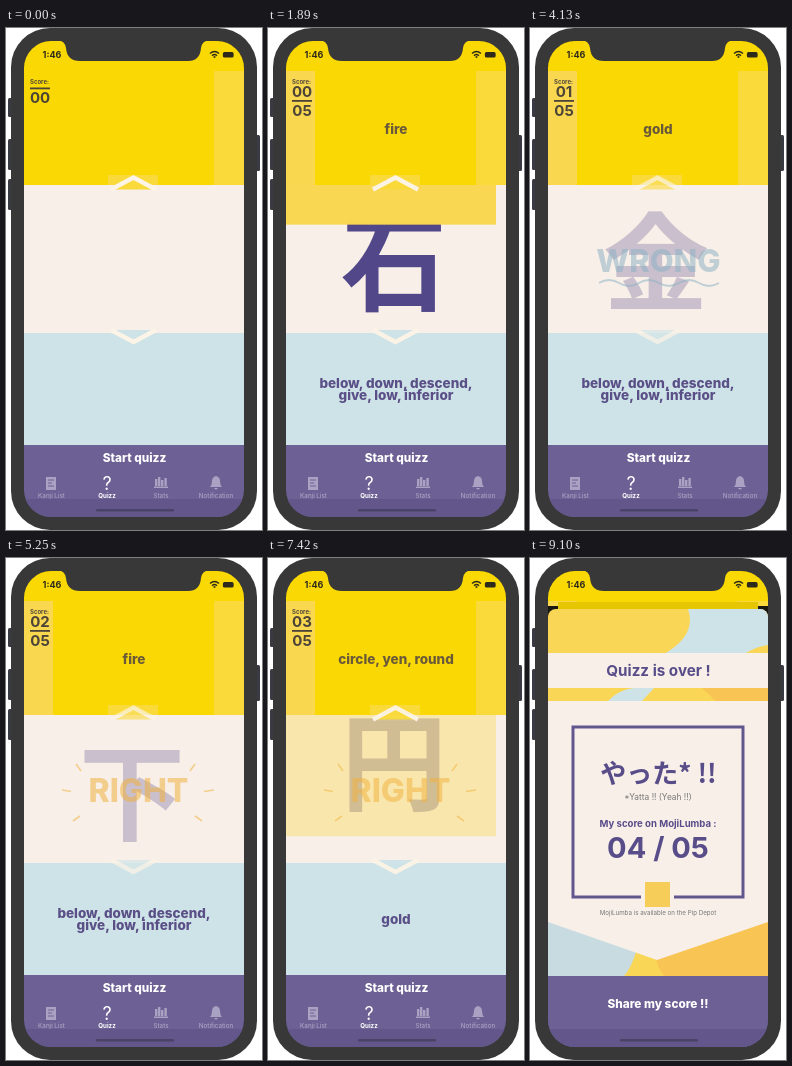
Animation of 256x502 px, one loop 9170 ms. Source, as an HTML page:

```html
<!DOCTYPE html>
<html lang="en">
<head>
<meta charset="utf-8">
<title>Quiz app</title>
<style>
html, body { margin: 0; width: 100%; height: 100%; overflow: hidden; background: #fff; }
svg { display: block; width: 100vw; height: 100vh; }
text { font-family: Inter, "Noto Sans CJK JP", "Noto Sans CJK", sans-serif; font-weight: 700; text-anchor: middle; fill: #584c89; }
.option { font-size: 13.5px; font-weight: 800; fill: #5a4f86; }
.action { font-size: 11.8px; font-weight: 800; fill: #fff; }
.tab { font-size: 6.2px; font-weight: 500; fill: #aaa2c3; }
.kanji { font-size: 106px; fill: #524788; }
.kanji, .kana { font-family: "Noto Sans CJK JP", "Noto Sans CJK", sans-serif; }
.score { font-size: 15px; fill: #4d4438; }
.small { font-weight: 400; fill: #777; }
</style>
</head>
<body>
<svg viewBox="0 0 256 502">
  <defs>
    <clipPath id="screenClip"><rect x="18" y="13" width="220" height="476" rx="27"/></clipPath>
    <clipPath id="cardClip"><rect x="18" y="157" width="220" height="148"/></clipPath>
    <clipPath id="sheetClip"><path d="M18 489V59a8 8 0 0 1 8-8H230a8 8 0 0 1 8 8V489Z"/></clipPath>
  </defs>

  <g fill="#393a42">
    <rect x="2" y="70" width="6" height="19" rx="1.5"/>
    <rect x="2" y="111" width="6" height="31" rx="1.5"/>
    <rect x="2" y="151" width="6" height="31" rx="1.5"/>
    <rect x="248" y="107" width="6" height="36" rx="1.5"/>
  </g>
  <rect x="5" y="0" width="246" height="502" rx="39" fill="#383839"/>

  <g clip-path="url(#screenClip)">
    <rect x="18" y="13" width="220" height="144" fill="#fad803"/>
    <path d="M208 43H238V157H208ZM102 147H152V157H102Z" fill="#fada3a"/>
    <rect id="margin" x="18" y="43" width="29" height="114" fill="#f9d850"/>
    <rect x="18" y="157" width="220" height="148" fill="#f7efe8"/>
    <rect x="18" y="305" width="220" height="112" fill="#cee3e8"/>
    <rect x="18" y="417" width="220" height="72" fill="#6c6094"/>

    <text class="score" x="33.5" y="56" style="font-size:6px">Score:</text>
    <text class="score" id="points" x="34" y="69.3"></text>
    <rect id="rule" x="24" width="20" height="1.8" fill="#4d4438"/>
    <text class="score" id="total" x="34"></text>

    <g clip-path="url(#cardClip)">
      <text class="kanji" id="kanji" x="126"></text>
      <rect id="cover" x="18" width="210"/>
    </g>

    <path id="bumps" d="M102 163 127.5 148 153 163ZM102 302 127.5 316 153 302Z" fill="#f7efe8"/>
    <g id="chevrons" stroke="#fcf4e6" stroke-width="4.5">
      <path d="M105 161.5 127.5 149.5 150 161.5" fill="#fada3a"/>
      <path d="M105 302 127.5 314 150 302" fill="#cee3e8"/>
    </g>

    <g id="right" stroke="#f1b13c" stroke-width="1.6">
      <text x="132.5" y="244" stroke="none" style="font-size:32px;font-weight:800;fill:#f1b13c">RIGHT</text>
      <path d="M70 206 75 213M56 232 65 233.5M67 263 74 258M189 206 184 213M208 232 198 233.5M196 263 189 258"/>
    </g>
    <g id="wrong">
      <text x="128.5" y="244" style="font-size:31px;font-weight:800;fill:#8fb3c4">WRONG</text>
      <path d="M69 255q10-6 20 0t20 0 20 0 20 0 20 0 20 0" fill="none" stroke="#8fb3c4" stroke-width="1.8"/>
    </g>

    <g id="options">
      <text class="option" id="upper" x="128" y="106" style="fill:#6b5a3a"></text>
      <text class="option" id="lower" x="128"></text>
      <text class="option" id="lower2" x="128" y="372"></text>
    </g>

    <text class="action" x="128.5" y="434">Start quizz</text>
    <g fill="#aaa2c3">
      <path d="M40 449H50V462H40Z"/>
      <path d="M42 452H48M42 455H46M42 458H48" stroke="#6c6094"/>
      <path d="M149 451h2.4v7h-2.4zM152 449h2.4v9h-2.4zM155 452h2.4v6h-2.4zM158.4 450h2.4v8h-2.4zM148 458.5h14v1.5h-14z"/>
      <path d="M204 459Q206 457 206 453Q206 449 210 448Q214 449 214 453Q214 457 216 459ZM208 460H212Q210 463 208 460Z"/>
    </g>
    <text x="101" y="462" style="font-size:18px;font-weight:400;fill:#fff">?</text>
    <text class="tab" x="45.5" y="470">Kanji List</text>
    <text class="tab" x="101" y="470" style="fill:#fff;font-weight:700">Quizz</text>
    <text class="tab" x="155" y="470">Stats</text>
    <text class="tab" x="210" y="470">Notification</text>

    <g id="backdrop">
      <path d="M18 48H238V70H18Z" fill="#181712"/>
      <path d="M28 52V44H228V70H28Z" fill="#e6c600"/>
    </g>

    <g id="sheet">
      <g clip-path="url(#sheetClip)">
        <rect x="18" y="51" width="220" height="370" fill="#f9d656"/>
        <path d="M158 51Q167 76 136 95H216Q228 88 238 87V51Z" fill="#cee3e8"/>
        <path d="M78 143Q90 131 104 130H124L112 143Z" fill="#cee3e8"/>
        <path d="M172 130H238V147H190Z" fill="#f8c453"/>
        <rect x="18" y="95" width="220" height="35" fill="#f7efe8"/>
        <path d="M18 360H112Q108 402 94 418H18Z" fill="#c8dbe0"/>
        <path d="M238 360H130Q118 398 134 418H238Z" fill="#f8c453"/>
        <path d="M18 143H238V364L127 402 18 364Z" fill="#f7efe8"/>
        <rect x="18" y="418" width="220" height="90" fill="#6c6094"/>
      </g>
      <text x="128.5" y="117.5" style="font-size:15.2px">Quizz is over !</text>
      <path d="M111 339H43V169H213V339H144" fill="none" stroke="#62568f" stroke-width="3"/>
      <text class="kana" x="128.5" y="225" style="font-size:26px">やった* !!</text>
      <text class="small" x="128" y="241.5" style="font-size:8.4px">*Yatta !! (Yeah !!)</text>
      <text x="128" y="269" style="font-size:9.6px">My score on MojiLumba :</text>
      <text x="128" y="299.5" style="font-size:29px">04 / 05</text>
      <rect x="115" y="324" width="25" height="25" fill="#f6cd58"/>
      <text class="small" x="128" y="356.5" style="font-size:6.2px">MojiLumba is available on the Pip Depot</text>
      <text class="action" x="128" y="449.5">Share my score !!</text>
    </g>

    <rect x="18" y="471" width="220" height="18" fill="#62568a"/>
    <rect x="90" y="481" width="78" height="2.4" rx="1.2" fill="#4b4268"/>

    <text x="46" y="30" style="font-size:9px;fill:#2d2a1c">1:46</text>
    <g fill="none" stroke="#2d2a1c" stroke-width="1.3">
      <path d="M204 25.5Q208.5 21.5 213 25.5M206 27.7Q208.5 25.3 211 27.7"/>
      <circle cx="208.5" cy="29" r=".4"/>
      <rect x="217.5" y="24.7" width="9.5" height="4.2" rx="1" fill="#2d2a1c"/>
    </g>
  </g>
  <path d="M52 12Q59 13 60 20Q61 33 74 33H182Q194 33 195 20Q196 13 203 12Z" fill="#383839"/>
</svg>

<script>
const LOOP = 9170, STEP = 70, START = 700, CARD = 148;
const BELOW = ["below, down, descend,", "give, low, inferior"];
const rounds = [
  { show: START, pick: 1820, kanji: "石", upper: "fire", lower: BELOW, up: true, right: true },
  { show: 2700, pick: 3680, kanji: "金", upper: "gold", lower: BELOW, up: false, right: false },
  { show: 4480, pick: 4800, kanji: "下", upper: "fire", lower: BELOW, up: false, right: true },
  { show: 5600, pick: 5980, kanji: "火", upper: "fire", lower: ["gold"], up: true, right: true },
  { show: 6780, pick: 7150, kanji: "円", upper: "circle, yen, round", lower: ["gold"], up: true, right: true }
];
// Each track is a list of [ms since the swipe, value].
const tracks = {
  kanji: [[0, 1], [100, 1], [270, .4], [450, .28], [620, .24], [780, 0]],
  shift: [[70, 0], [270, 30], [450, 0]],
  verdict: [[100, 0], [270, .5], [400, .55], [620, .5], [780, 0]],
  chevrons: [[0, 1], [270, .95], [430, .6], [620, .6], [780, 1]]
};

const $ = id => document.getElementById(id);
const clamp = v => Math.max(0, Math.min(1, v));
const set = (id, attrs) => { for (const k in attrs) $(id).setAttribute(k, attrs[k]); };
const write = (id, text) => { if ($(id).textContent !== text) $(id).textContent = text; };

function sample(track, t) {
  const i = track.findIndex(([at]) => at > t);
  if (i < 0) return track[track.length - 1][1];
  if (i === 0) return track[0][1];
  const [a, from] = track[i - 1], [b, to] = track[i];
  return from + (to - from) * (t - a) / (b - a);
}

function drawScore(t) {
  const started = t >= START;
  const points = rounds.filter(r => r.right && t >= r.pick + 380).length;
  write("points", started ? "0" + points : "");
  write("total", started ? "05" : "00");
  set("rule", { y: started ? 72 : 59.5 });
  set("total", { y: started ? 87.5 : 74.5 });
}

function drawRound(t) {
  const round = rounds.filter(r => t >= r.show).pop();
  const since = round ? t - round.pick : -1;
  const fadeIn = round ? clamp((t - round.show + STEP) / 210) : 0;
  const active = round || rounds[0];
  const dir = active.up ? -1 : 1;
  const shift = sample(tracks.shift, since) * dir;

  write("kanji", active.kanji);
  set("kanji", { y: 274 + shift, opacity: fadeIn * sample(tracks.kanji, since) });

  const two = active.lower.length > 1;
  write("upper", active.upper);
  write("lower", active.lower[0]);
  write("lower2", active.lower[1] || "");
  set("lower", { y: two ? 360 : 366 });
  set("options", { opacity: fadeIn });

  const progress = clamp(since / 440);
  const height = CARD * (1 - Math.pow(1 - progress, 1.8));
  set("cover", {
    y: active.up ? 157 : 305 - height,
    height,
    fill: active.up ? "#f9d752" : "#cee3e8",
    opacity: clamp(1.2 - 1.3 * progress)
  });
  // The swipe that follows the start leaves a lighter strip beside the score.
  set("margin", { opacity: t >= rounds[0].pick ? 1 : 0 });

  const verdict = sample(tracks.verdict, since);
  set("right", { opacity: active.right ? verdict : 0 });
  set("wrong", { opacity: active.right ? 0 : verdict });
  const chevrons = sample(tracks.chevrons, since);
  set("chevrons", { opacity: chevrons });
  set("bumps", { opacity: 1 - chevrons });
}

function drawSheet(t) {
  const progress = clamp((t - 7650) / 520);
  set("sheet", { transform: `translate(0 ${450 * Math.pow(1 - progress, 3)})` });
  set("backdrop", { opacity: clamp(progress * 2) });
}

function frame() {
  const t = Math.floor(performance.now() % LOOP / STEP) * STEP;
  drawScore(t);
  drawRound(t);
  drawSheet(t);
  requestAnimationFrame(frame);
}
frame();
</script>
</body>
</html>
```
